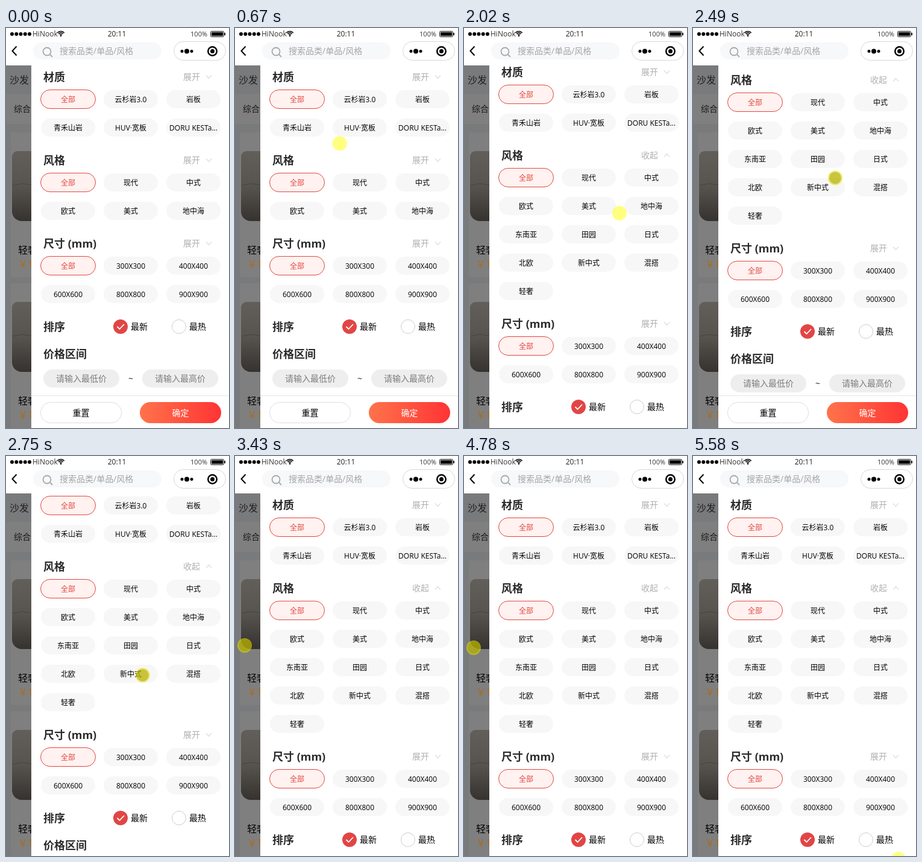
These frames come from a looping animation (370 px wide and 663 px high, 5.65 s). An HTML page with a canvas:

```html
<!DOCTYPE html>
<html lang="zh">
<head>
<meta charset="utf-8">
<title>筛选</title>
<style>
html, body { margin: 0; width: 100%; height: 100%; overflow: hidden; background: #fff; }
canvas { display: block; width: 370px; height: 663px; }
</style>
</head>
<body>
<canvas id="stage"></canvas>
<script>
const W = 370, H = 663, LOOP = 5650;
const HEADER = 62, DRAWER_X = 42, MID = 38;
const EXPAND_AT = 1550, EXTRA = 141, MAX_SCROLL = 133;
const PILL_PITCH = 104, ROW_PITCH = 47;
const FONT = '"Open Sans", "Noto Sans CJK SC", "Noto Sans CJK", sans-serif';
const INK = '#000', TITLE = '#2a2a2a', RED = '#e2463f', MUTED = '#b0b0b0';

const canvas = document.getElementById('stage');
const ctx = canvas.getContext('2d');
const ratio = window.devicePixelRatio || 1;
canvas.width = W * ratio;
canvas.height = H * ratio;

const MATERIALS = ['全部', '云杉岩3.0', '岩板', '青禾山岩', 'HUV·宽板', 'DORU KESTa...'];
const STYLES = ['全部', '现代', '中式', '欧式', '美式', '地中海',
  '东南亚', '田园', '日式', '北欧', '新中式', '混搭', '轻奢'];
const SIZES = ['全部', '300X300', '400X400', '600X600', '800X800', '900X900'];

// Pointer stops: time, x, y
const STOPS = [
  [70, 183, 332], [600, 176, 204], [850, 168, 159], [1400, 272, 210],
  [EXPAND_AT, 272, 210], [2020, 258, 307], [2490, 236, 248], [2800, 225, 385], [3100, 17, 348]
];
const SWAY_FROM = 3100, SWAY_TO = 4850, EXIT = 5190, RETURN = 5580;

const between = (t, from, to) => t >= from && t < to;

function ease(t, from, to) {
  const k = Math.min(1, Math.max(0, (t - from) / (to - from)));
  return k * k * (3 - 2 * k);
}

function mix([t0, x0, y0], [t1, x1, y1], t) {
  const k = (t - t0) / (t1 - t0);
  return [x0 + (x1 - x0) * k, y0 + (y1 - y0) * k];
}

// Slow up-and-down drag along the left edge
function sway(t) {
  const u = t - SWAY_FROM;
  return [16, 285 + 0.028 * u + 68 * Math.cos(0.00503 * u - 0.39)];
}

function pointerAt(t) {
  if (t < STOPS[0][0] || between(t, EXIT, RETURN)) return null;
  if (t >= RETURN) return [341, 668];
  if (t >= SWAY_TO) return mix([SWAY_TO, ...sway(SWAY_TO)], [EXIT, 346, 722], t);
  if (t >= SWAY_FROM) return sway(t);
  const next = STOPS.findIndex(stop => stop[0] > t);
  return mix(STOPS[next - 1], STOPS[next], t);
}

function isPressed(t) {
  return between(t, 1390, EXPAND_AT) || between(t, 2090, 2800) || between(t, 3150, SWAY_TO);
}

function scrollAt(t) {
  return MAX_SCROLL * (ease(t, 1960, 2380) - ease(t, 2500, 2880));
}

function text(str, x, cy, size, color, align = 'left', weight = 400) {
  ctx.font = `${weight} ${size}px ${FONT}`;
  ctx.textAlign = align;
  ctx.fillStyle = color;
  ctx.fillText(str, x, cy + size * 0.38);
}

function rect(x, y, w, h, color) {
  ctx.fillStyle = color;
  ctx.fillRect(x, y, w, h);
}

function round(x, y, w, h, radius, fill, stroke) {
  ctx.beginPath();
  ctx.roundRect(x, y, w, h, radius);
  if (fill) {
    ctx.fillStyle = fill;
    ctx.fill();
  }
  if (stroke) {
    ctx.strokeStyle = stroke;
    ctx.lineWidth = 1;
    ctx.stroke();
  }
}

function pill(x, y, w, h, fill, stroke) {
  round(x, y, w, h, h / 2, fill, stroke);
}

function disc(x, y, r, color) {
  ctx.beginPath();
  ctx.arc(x, y, r, 0, Math.PI * 2);
  ctx.fillStyle = color;
  ctx.fill();
}

function ring(x, y, r, width, color, from = 0, to = Math.PI * 2) {
  ctx.beginPath();
  ctx.arc(x, y, r, from, to);
  ctx.strokeStyle = color;
  ctx.lineWidth = width;
  ctx.stroke();
}

function line(points, width, color) {
  ctx.beginPath();
  points.forEach(([x, y]) => ctx.lineTo(x, y));
  ctx.strokeStyle = color;
  ctx.lineWidth = width;
  ctx.stroke();
}

function gradient(x0, y0, x1, y1, ...colors) {
  const fill = ctx.createLinearGradient(x0, y0, x1, y1);
  colors.forEach((c, i) => fill.addColorStop(i / (colors.length - 1), c));
  return fill;
}

function sofaCard(y) {
  ctx.save();
  ctx.translate(0, y);
  round(8, 0, 60, 240, 4, '#7f7f7f');
  round(10, 31, 60, 116, [9, 0, 0, 16], gradient(0, 31, 0, 147, '#625f5b', '#57544f', '#35322f'));
  line([[11, 88], [26, 85], [42, 87]], 1, '#46433f');
  text('轻奢', 20, 195, 16, INK);
  text('￥1', 20, 218, 16, '#a96c1d');
  ctx.restore();
}

function page() {
  rect(0, HEADER, DRAWER_X, H - HEADER, '#797a7c');
  rect(0, 109, DRAWER_X, 50, '#7f7f7f');
  text('沙发', 6, 86, 16, '#221d1e');
  text('综合', 13, 134, 14, '#1a1a1a');
  sofaCard(173);
  sofaCard(423);
}

function title(str, cy) {
  text(str, 62, cy, 18, TITLE, 'left', 700);
}

function option(label, i, top) {
  const x = 58 + (i % 3) * PILL_PITCH;
  const y = top + Math.floor(i / 3) * ROW_PITCH;
  if (i === 0) pill(x - 0.5, y - 0.5, 91, 31, '#fff2f0', RED);
  else pill(x, y, 90, 30, '#f7f7f7');
  text(label, x + 45, y + 15, 12, i ? INK : RED, 'center');
}

function section(name, cy, items, open) {
  title(name, cy);
  text(open ? '收起' : '展开', 294, cy, 14, MUTED);
  const d = open ? -2.5 : 2.5;
  line([[332, cy - d], [336.5, cy + d], [341, cy - d]], 1.2, '#dedede');
  items.forEach((label, i) => option(label, i, cy + 22));
}

function sorting(y) {
  title('排序', y);
  disc(190, y, 12, '#e24545');
  line([[184.5, y], [188.5, y + 4], [196, y - 4]], 1.8, '#fff');
  text('最新', 207, y, 14, INK);
  ring(287, y, 11.5, 1, '#c9ccd2');
  text('最热', 304, y, 14, INK);
}

function priceInput(x, y, label) {
  pill(x, y, 126, 30, '#eee');
  text(label, x + 63, y + 15, 14, '#7b7b7b', 'center');
}

function prices(y) {
  title('价格区间', y);
  priceInput(62, y + 26, '请输入最低价');
  text('~', 207, y + 41, 14, '#222', 'center');
  priceInput(226, y + 26, '请输入最高价');
}

function footer(y) {
  rect(DRAWER_X, y, W - DRAWER_X, 54, '#fff');
  rect(DRAWER_X, y, W - DRAWER_X, 1, '#e6e6e6');
  pill(57.5, y + 11.5, 134, 34, '#fff', '#dedede');
  text('重置', 124.5, y + 29, 14, INK, 'center');
  pill(222, y + 11, 135, 35, gradient(222, 0, 357, 0, '#ff734b', '#ff3434'));
  text('确定', 289.5, y + 29, 14, '#fff', 'center');
}

function drawer(open, scroll) {
  const shift = open ? EXTRA : 0;
  ctx.save();
  ctx.beginPath();
  ctx.rect(DRAWER_X, HEADER, W - DRAWER_X, H - HEADER);
  ctx.clip();
  rect(DRAWER_X, HEADER, W - DRAWER_X, H - HEADER, '#fff');
  ctx.translate(0, -Math.round(scroll));
  section('材质', 81, MATERIALS, false);
  section('风格', 219, open ? STYLES : STYLES.slice(0, 6), open);
  section('尺寸 (mm)', 357 + shift, SIZES, false);
  sorting(495 + shift);
  prices(540 + shift);
  footer(609 + (open ? MAX_SCROLL : 0));
  ctx.restore();
}

function statusBar() {
  for (let i = 0; i < 5; i++) disc(10 + i * 7.25, 10, 3, INK);
  text('HiNook', 44, 9, 12, '#333');
  for (let r = 2.5; r < 8; r += 2.5) {
    ring(91, 13, r, 1.5, INK, -Math.PI * 0.77, -Math.PI * 0.23);
  }
  disc(91, 13, 1.2, INK);
  text('20:11', 184, 9, 12, '#222', 'center');
  text('100%', 334, 10, 11, '#333', 'right');
  round(339.5, 5.5, 22, 9, 2, null, INK);
  rect(341, 7, 19, 6, INK);
  rect(362.5, 8, 1.5, 4, INK);
}

function header() {
  rect(0, 0, W, HEADER, '#fff');
  statusBar();
  line([[17.5, MID - 7.5], [10.5, MID], [17.5, MID + 7.5]], 2, INK);
  pill(45, 24, 213, 28, '#f7f8fa');
  ring(68, 39, 6.5, 1.8, '#a9a9a9');
  line([[73, 44], [77, 48]], 1.8, '#a9a9a9');
  text('搜索品类/单品/风格', 89, MID, 14, '#a5a5a5');

  pill(278.5, 22.5, 86, 31, '#fff', '#d8d8d8');
  for (const side of [-1, 0, 1]) disc(300 + side * 8, MID + 0.5, side ? 2.5 : 4, INK);
  ring(342.5, MID + 0.5, 7.25, 2.5, INK);
  disc(342.5, MID + 0.5, 3.5, INK);
}

function pointer(t) {
  const at = pointerAt(t);
  if (!at) return;
  disc(...at, 12, 'rgba(255,255,0,0.5)');
  if (isPressed(t)) {
    ring(...at, 11, 2, 'rgba(150,140,0,0.15)');
    disc(...at, 10, 'rgba(150,140,0,0.5)');
  }
}

function draw(t) {
  ctx.setTransform(ratio, 0, 0, ratio, 0, 0);
  page();
  drawer(t >= EXPAND_AT, scrollAt(t));
  header();
  pointer(t);
}

const start = performance.now();
function tick() {
  draw((performance.now() - start) % LOOP);
  requestAnimationFrame(tick);
}
tick();
</script>
</body>
</html>
```
